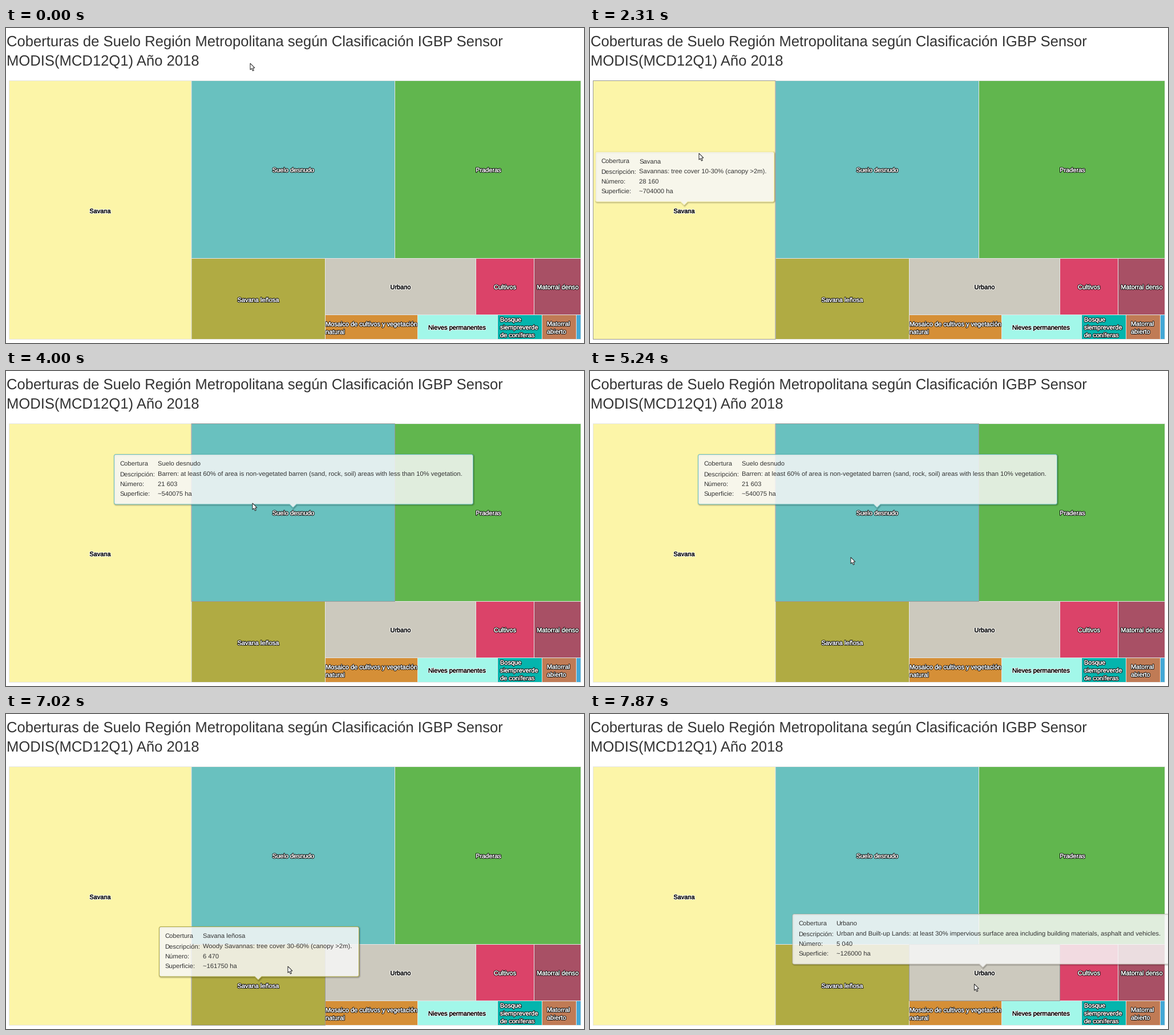
Animation, 1013 px wide and 553 px high, one loop 8000 ms. Source, as a matplotlib script:

```python
import matplotlib.pyplot as plt
import matplotlib.patheffects as pe
from matplotlib.animation import FuncAnimation
from matplotlib.patches import PathPatch, Polygon, Rectangle
from matplotlib.path import Path
from matplotlib.transforms import Affine2D
import numpy as np

W, H, DPI = 1013, 553, 72          # at 72 dpi one point is one pixel
LOOP, INTERVAL = 8000, 40
TICK = LOOP / 104                  # the screen refreshes 104 times per loop
GRID, HOVER, INK = "#e6e6e6", "#999999", "#333333"

plt.rcParams["font.family"] = "Liberation Sans"
plt.rcParams["text.hinting"] = "none"

TITLE = [
    "Coberturas de Suelo Región Metropolitana según Clasificación IGBP Sensor",
    "MODIS(MCD12Q1) Año 2018",
]

# left, top, right, bottom, fill
CELLS = {
    "savana": (5, 92, 324.5, 546, "#fcf5a8"),
    "suelo": (324.5, 92, 681, 404, "#69c1bf"),
    "praderas": (681, 92, 1007, 404, "#61b64e"),
    "lenosa": (324.5, 404, 559, 546, "#b0ab43"),
    "urbano": (559, 404, 823, 503, "#ccc9be"),
    "cultivos": (823, 404, 925, 503, "#db4369"),
    "denso": (925, 404, 1007, 503, "#a85065"),
    "mosaico": (559, 503, 721, 546, "#d58f37"),
    "nieves": (721, 503, 861, 546, "#a2f7e9"),
    "bosque": (861, 503, 939, 546, "#04b5ad"),
    "abierto": (939, 503, 999, 546, "#c07b55"),
    "agua": (999, 503, 1007, 546, "#42a8d6"),
}

# x, first baseline, alignment, dark text, lines
LABELS = [
    (165, 325, "center", True, ["Savana"]),
    (503.5, 253, "center", False, ["Suelo desnudo"]),
    (845.5, 253, "center", False, ["Praderas"]),
    (442, 481, "center", False, ["Savana leñosa"]),
    (691.5, 458.5, "center", True, ["Urbano"]),
    (874.5, 458.5, "center", False, ["Cultivos"]),
    (967, 458.5, "center", False, ["Matorral denso"]),
    (560, 523.5, "left", False, ["Mosaico de cultivos y vegetación", "natural"]),
    (790.5, 529.5, "center", True, ["Nieves permanentes"]),
    (866, 515.5, "left", False, ["Bosque", "siempreverde", "de coníferas"]),
    (948, 523, "left", False, ["Matorral", "abierto"]),
]

FIELDS = ["Cobertura", "Descripción:", "Número:", "Superficie:"]

# left, top, width, pointer x, values
TIPS = {
    "savana": (9.5, 217.5, 313, 165, [
        "Savana", "Savannas: tree cover 10-30% (canopy >2m).",
        "28 160", "~704000 ha"]),
    "suelo": (189.5, 146.5, 629, 503, [
        "Suelo desnudo",
        "Barren: at least 60% of area is non-vegetated barren "
        "(sand, rock, soil) areas with less than 10% vegetation.",
        "21 603", "~540075 ha"]),
    "lenosa": (268.5, 373.5, 350, 442, [
        "Savana leñosa", "Woody Savannas: tree cover 30-60% (canopy >2m).",
        "6 470", "~161750 ha"]),
    "urbano": (356, 351.5, 667, 691, [
        "Urbano",
        "Urban and Built-up Lands: at least 30% impervious surface area "
        "including building materials, asphalt and vehicles.",
        "5 040", "~126000 ha"]),
}
TIP_H, POINTER, RADIUS = 87.5, 6, 3

# tick at which each tooltip takes over
VISITS = [(18, "suelo"), (20.5, "savana"), (42.5, "suelo"),
          (71, "lenosa"), (94.5, "urbano")]

# tick, x, y
MOUSE = np.array([
    (14, 428, 62), (17, 352, 92), (20, 275, 123), (23, 221, 178),
    (25, 200, 207), (28, 191, 220), (38, 191, 220), (40, 230, 222),
    (42.5, 325, 226), (46, 405, 231), (49, 432, 232), (63, 432, 232),
    (66, 443, 275), (71, 478, 405), (73, 487, 431), (77, 494, 443),
    (91, 494, 443), (94.5, 560, 450), (98, 630, 463), (102, 673.5, 474),
])

fig = plt.figure(figsize=(W / DPI, H / DPI), dpi=DPI, facecolor="white")
ax = fig.add_axes([0, 0, 1, 1])
ax.set(xlim=(0, W), ylim=(H, 0))
ax.axis("off")


def write(x, y, s, size, color=INK, **kw):
    return ax.text(x, y, s, fontsize=size, color=color, va="baseline", **kw)


def cell_box(name, **kw):
    left, top, right, bottom, _ = CELLS[name]
    # edges already sit on pixel centres, snapping would push them off
    box = Rectangle((left + .5, top + .5), right - left, bottom - top,
                    lw=1, snap=False, **kw)
    return ax.add_patch(box)


def callout(x, y, w, h, px):
    """Rounded box with a small pointer below it at px."""
    r, x2, y2 = RADIUS, x + w, y + h
    pts = [(x + r, y), (x2 - r, y), (x2, y), (x2, y + r), (x2, y2 - r),
           (x2, y2), (x2 - r, y2)]
    codes = [1, 2, 3, 3, 2, 3, 3]
    if x + r + POINTER < px < x2 - r - POINTER:
        pts += [(px + POINTER, y2), (px, y2 + POINTER), (px - POINTER, y2)]
        codes += [2, 2, 2]
    pts += [(x + r, y2), (x, y2), (x, y2 - r), (x, y + r), (x, y),
            (x + r, y), (x + r, y)]
    codes += [2, 3, 3, 2, 3, 3, Path.CLOSEPOLY]
    return Path(pts, codes)


for row, line in enumerate(TITLE):
    write(1, 32 + 35 * row, line, 25.6)

for name, cell in CELLS.items():
    cell_box(name, fc=cell[4], ec=GRID, zorder=1)

HOVERS = VISITS[1:]
outlines = [cell_box(name, fill=False, ec=HOVER, zorder=2)
            for _, name in HOVERS]

for x, y, align, dark, lines in LABELS:
    ink, halo = ("black", "white") if dark else ("white", "black")
    effects = [pe.Stroke(linewidth=2.2, foreground=halo),
               pe.withStroke(linewidth=.3, foreground=ink)]
    for row, line in enumerate(lines):
        write(x, y + 13.7 * row, line, 11, ink, ha=align, zorder=3,
              path_effects=effects)

blank = callout(0, 0, 50, 50, 25)
offset = Affine2D().translate(1, 1) + ax.transData
shadows = [ax.add_patch(PathPatch(blank, fill=False, ec="black", lw=7 - 2 * i,
                                  alpha=.05 * i, transform=offset, zorder=5))
           for i in (1, 2, 3)]
bubble = ax.add_patch(PathPatch(blank, fc=(.97, .97, .97, .85), lw=1, zorder=6))
keys = [write(0, 0, s, 11.3, zorder=7) for s in FIELDS]
values = [write(0, 0, "", 11.3, zorder=7) for _ in FIELDS]
tooltip = [*shadows, bubble, *keys, *values]

ARROW = np.array([(0, 0), (0, 11.3), (2.5, 9), (4.4, 13.2), (6.3, 12.4),
                  (4.5, 8.3), (7.9, 8)])
pointer = ax.add_patch(Polygon(ARROW, fc="white", ec="#222222", lw=1,
                               joinstyle="miter", zorder=9))


def place_tooltip(n):
    current = [i for i, (start, _) in enumerate(VISITS) if n >= start]
    for part in tooltip:
        part.set_visible(bool(current))
    if not current:
        return
    i = current[-1]
    start, name = VISITS[i]
    x, y, w, px, texts = TIPS[name]
    x0, y0, _, px0, _ = TIPS[VISITS[max(i - 1, 0)][1]]

    # each step closes a third of the gap in x and half of it in y
    steps = 1.5 * (n - start)
    gap_x, gap_y = ((2 / 3) ** steps, .5 ** steps) if steps < 14 else (0, 0)
    x += (x0 - x) * gap_x
    px += (px0 - px) * gap_x
    y += (y0 - y) * gap_y

    shape = callout(x, y, w, TIP_H, px)
    for patch in (*shadows, bubble):
        patch.set_path(shape)
    bubble.set_edgecolor(CELLS[name][4])
    for row, (key, value) in enumerate(zip(keys, values)):
        base = y + 20.8 + 17.5 * row
        key.set_position((x + 10, base))
        value.set_position((x + 76.5, base))
        value.set_text(texts[row])


def place_outlines(n):
    for i, (start, _) in enumerate(HOVERS):
        end = HOVERS[i + 1][0] if i + 1 < len(HOVERS) else np.inf
        u = np.clip((n - end) / 6, 0, 1)
        strength = 1 - u * u * (3 - 2 * u) if n >= start else 0
        outlines[i].set_visible(strength > 0)
        outlines[i].set_alpha(strength)


def draw(frame):
    n = int((frame * INTERVAL + 30) / TICK)
    place_tooltip(n)
    place_outlines(n)
    tip = [np.interp(n, MOUSE[:, 0], MOUSE[:, k]) for k in (1, 2)]
    pointer.set_xy(ARROW + tip)
    return [*tooltip, *outlines, pointer]


anim = FuncAnimation(fig, draw, frames=LOOP // INTERVAL, interval=INTERVAL,
                     repeat=True, repeat_delay=0, blit=False)
plt.show()
```
